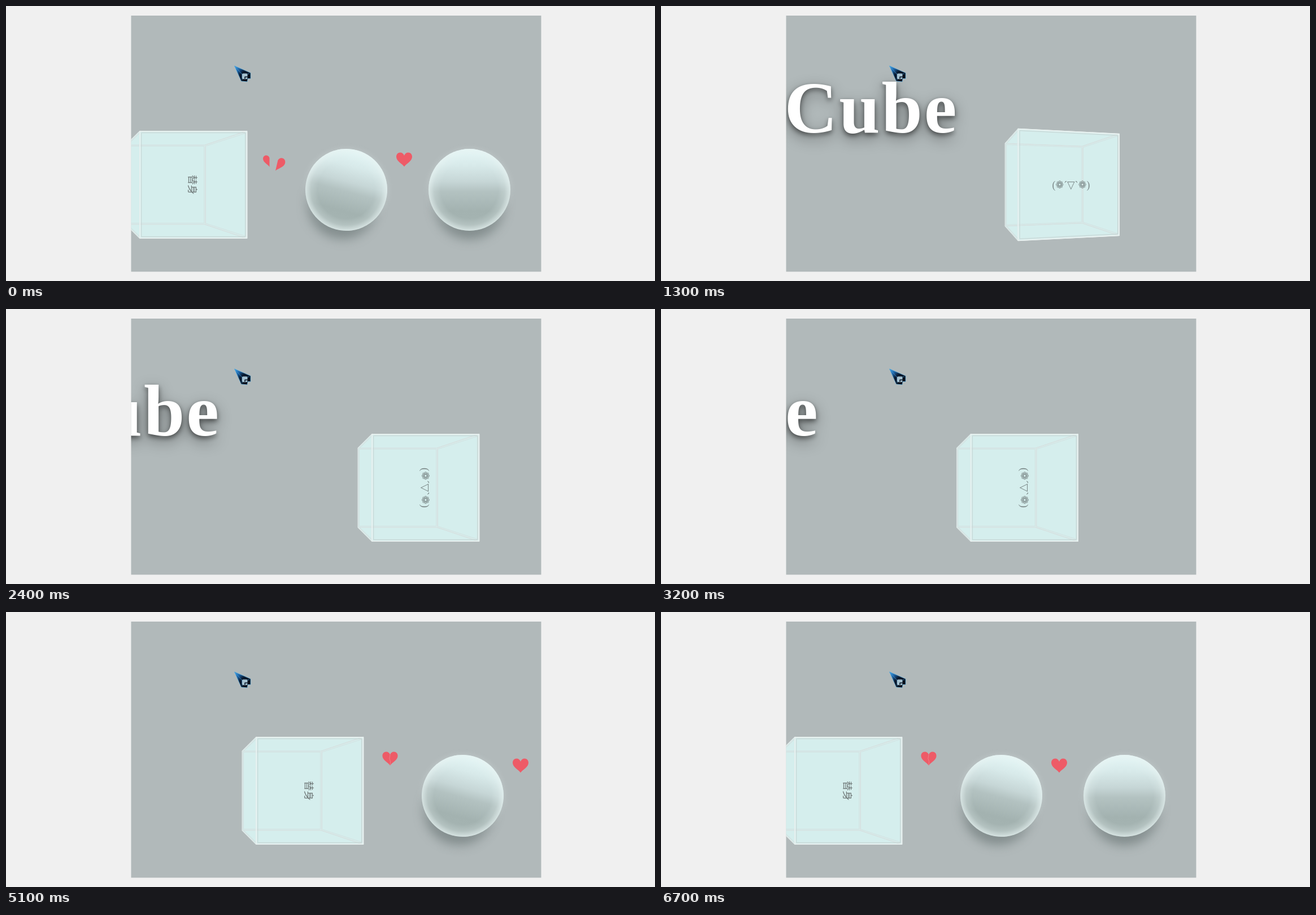
Animation, 1149 px wide and 487 px high, one loop 8000 ms. Source, as an HTML page:

```html
<!DOCTYPE html>
<html lang="en">
<head>
<meta charset="utf-8">
<title>Rolling cube</title>
<style>
html, body { margin: 0; width: 100%; height: 100%; overflow: hidden; background: #f0f0f0; }
svg { display: block; width: 1149px; height: 487px; }
#title { font: bold 130px "Liberation Serif", serif; letter-spacing: 3px; fill: #fff;
  filter: drop-shadow(0 4px 4px rgba(0,0,0,.5)) drop-shadow(0 8px 12px rgba(0,0,0,.35)); }
#label { font-family: "Liberation Serif", "DejaVu Sans", "Noto Sans CJK SC", "Noto Sans CJK", serif; text-anchor: middle; }
path { stroke-linejoin: round; }
</style>
</head>
<body>
<svg viewBox="0 0 1149 487">
  <defs>
    <clipPath id="frame"><rect x="221.5" y="17" width="726" height="453.5"/></clipPath>
    <linearGradient id="ball" x1="0" y1="0" x2="0" y2="1">
      <stop offset="0" stop-color="#e3f6f6"/>
      <stop offset=".2" stop-color="#d8eaea"/>
      <stop offset=".4" stop-color="#c6d6d6"/>
      <stop offset=".52" stop-color="#b3c2c1"/>
      <stop offset=".76" stop-color="#a3b2b0"/>
      <stop offset="1" stop-color="#a6b5b3"/>
    </linearGradient>
    <radialGradient id="rim">
      <stop offset=".7" stop-color="#e8f4f3" stop-opacity="0"/>
      <stop offset=".86" stop-color="#e8f4f3" stop-opacity=".22"/>
      <stop offset="1" stop-color="#e8f4f3" stop-opacity=".72"/>
    </radialGradient>
    <linearGradient id="blade" gradientUnits="userSpaceOnUse" x1="404" y1="106" x2="426" y2="128">
      <stop offset="0" stop-color="#3aa5f2"/>
      <stop offset=".35" stop-color="#1c5f9f"/>
      <stop offset=".6" stop-color="#0a1a30"/>
      <stop offset="1" stop-color="#060d18"/>
    </linearGradient>
    <filter id="soft" x="-50%" y="-50%" width="200%" height="200%"><feGaussianBlur stdDeviation="10"/></filter>
    <filter id="glow" x="-50%" y="-50%" width="200%" height="200%"><feGaussianBlur stdDeviation="5"/></filter>
    <path id="half" fill="#ee5b67" d="M0 12.5C-3 7.5-14 3-14-5C-14-9.5-11-12.5-7.2-12.5C-3.8-12.5-1-10.5 0-7Z"/>
    <g id="sphere">
      <circle r="74" fill="#d5dfdf" opacity=".3" filter="url(#glow)"/>
      <circle cy="26" r="61" fill="#5d6969" opacity=".6" filter="url(#soft)"/>
      <circle r="72.5" fill="url(#ball)"/>
      <circle r="72.5" fill="url(#rim)"/>
    </g>
  </defs>

  <rect width="1149" height="487" fill="#f0f0f0"/>
  <rect x="221.5" y="17" width="726" height="453.5" fill="#b1b9ba"/>
  <g clip-path="url(#frame)">
    <text id="title" y="224">Cube</text>
    <path id="ring" fill="#edf5f4" stroke="#edf5f4" stroke-width="2"/>
    <path id="body" fill="#d5eeed"/>
    <path id="edges" fill="none" stroke="#d9e5e4" stroke-width="1"/>
    <path id="insets" fill="none" stroke="#d3dedd" stroke-width=".8"/>
    <path id="frontInset" fill="none" stroke="#c6d3d2" stroke-width="1"/>
    <path id="front" fill="none" stroke="#e9f2f1" stroke-width="1.8"/>
    <text id="label"></text>
    <g id="row">
      <use href="#sphere" transform="translate(391.5 325.5) rotate(15)"/>
      <use href="#sphere" transform="translate(609.5 325.5)"/>
      <g transform="translate(494 272)">
        <use href="#half"/><use href="#half" transform="scale(-1 1)"/>
      </g>
      <g id="heart" transform="translate(263 259.7) scale(.97)">
        <use href="#half"/><use href="#half" transform="scale(-1 1)"/>
        <path d="M0-7L-1.2 0L.6 5L0 12" fill="none" stroke="#f08f97" stroke-width=".7"/>
      </g>
      <g id="broken">
        <use href="#half" transform="translate(255.5 274.7) scale(.82)"/>
        <use href="#half" transform="translate(266 292) rotate(13) translate(0 -12.5) scale(-.97 .97)"/>
      </g>
    </g>
  </g>
  <g id="pointer">
    <path d="M404.500 106L433 118.500V128.500H428L427 134L416.500 133Z" fill="url(#blade)" stroke="#58a9dc" stroke-width=".7"/>
    <path d="M405 106.500L418 121L418 131M418 121L431 120" fill="none" stroke="#3f94d2" stroke-width=".8"/>
    <rect x="418" y="119.500" width="9.500" height="10" rx="2" fill="#a5c1d0"/>
    <path d="M423 129V125.500H429" fill="none" stroke="#0a1626" stroke-width="1.500"/>
  </g>
</svg>
<script>
const $ = id => document.getElementById(id);
const LOOP = 8000, HALF = 80.5, DEPTH = 540, MID_Y = 316.5;

const range = (from, to, step) =>
  Array.from({ length: (to - from) / step + 1 }, (_, i) => from + i * step);

// The picture holds between these moments.
const ticks = [0, 400, ...range(600, 2400, 100), ...range(2900, 3400, 100),
  3600, 3700, 3900, ...range(4100, 4300, 100), ...range(4500, 6700, 200)];

const titleScroll = [[400, 112], [1300, 0], [2000, -96], [2400, -146.5], [3200, -246], [3400, -272]];
const rowScroll = [[3600, 612],
  ...[518, 493, 467, 440, 417, 388, 358, 329, 302, 274, 250, 220, 211].map((x, i) => [4300 + i * 200, x])];
const sway = [[400, 0], [1300, 16], [1400, 3], [1500, 0]];
const firstRoll = [[1500, 0], [2400, 90]];
const secondRoll = [[3600, 29], [4300, 90]];

function at(keys, t) {
  if (t <= keys[0][0]) return keys[0][1];
  for (let i = 1; i < keys.length; i++) {
    const [t0, v0] = keys[i - 1], [t1, v1] = keys[i];
    if (t <= t1) return v0 + (v1 - v0) * (t - t0) / (t1 - t0);
  }
  return keys[keys.length - 1][1];
}

// Corners of one face; k below 1 gives the line inside its border.
function face(axis, sign, k) {
  return [[-1, -1], [1, -1], [1, 1], [-1, 1]].map(([u, v]) => {
    const p = [u * k * HALF, v * k * HALF];
    p.splice(axis, 0, sign * HALF);
    return p;
  });
}

const sides = [[2, -1], [0, -1], [0, 1], [1, -1], [1, 1], [2, 1]];

// Turn about the vertical axis, then roll over the lower right edge.
function projector(eyeX, turn, roll) {
  const a = turn * Math.PI / 180, b = roll * Math.PI / 180;
  return ([x, y, z]) => {
    const tx = x * Math.cos(a) + z * Math.sin(a) - HALF, ty = y - HALF;
    const tz = z * Math.cos(a) - x * Math.sin(a);
    const rx = tx * Math.cos(b) - ty * Math.sin(b) + HALF;
    const ry = tx * Math.sin(b) + ty * Math.cos(b) + HALF;
    const s = DEPTH / (DEPTH - tz);
    return [eyeX + rx * s, MID_Y + ry * s];
  };
}

function drawCube(eyeX, turn, roll, text, size, baseline, color) {
  const project = projector(eyeX, turn, roll);
  const outline = (side, k) =>
    "M" + face(...side, k).map(p => project(p).map(n => n.toFixed(2)).join(" ")).join("L") + "Z";
  const all = sides.map(s => outline(s, 1));
  // Separate winding would leave holes, so the solid is filled with nonzero pairs.
  const solid = sides.map((s, i) => {
    const q = face(...s, 1).map(project);
    const area = q.reduce((sum, p, j) => {
      const n = q[(j + 1) % 4];
      return sum + p[0] * n[1] - n[0] * p[1];
    }, 0);
    return "M" + (area < 0 ? q.reverse() : q).map(p => p.join(" ")).join("L") + "Z";
  }).join("");
  $("ring").setAttribute("d", solid);
  $("body").setAttribute("d", solid);
  $("edges").setAttribute("d", all.join(""));
  $("insets").setAttribute("d", sides.slice(0, 5).map(s => outline(s, .972)).join(""));
  $("frontInset").setAttribute("d", outline(sides[5], .972));
  $("front").setAttribute("d", all[5]);

  const spot = (x, y) => project([x, y, HALF]);
  const slope = (p, q) => [(q[0] - p[0]) / 60, (q[1] - p[1]) / 60];
  const m = [...slope(spot(-30, 0), spot(30, 0)), ...slope(spot(0, -30), spot(0, 30)), ...spot(0, 0)];
  const label = $("label");
  if (label.textContent !== text) label.textContent = text;
  label.setAttribute("transform", `matrix(${m.join(" ")})`);
  label.setAttribute("font-size", size);
  label.setAttribute("y", baseline);
  label.setAttribute("fill", color);
}

const show = (id, on) => $(id).setAttribute("visibility", on ? "visible" : "hidden");

function render(time) {
  const t = ticks.filter(x => x <= time).pop();
  const titled = t >= 400 && t < 3600;
  show("title", titled);
  show("row", !titled);
  show("heart", t >= 5100);
  show("broken", t < 400);
  if (titled) {
    const shift = at(titleScroll, t);
    $("title").setAttribute("x", 218.4 + shift);
    drawCube(700 + shift, at(sway, t), at(firstRoll, t), "(❁´▽`❁)", 16, 5.5, "#7b8888");
  } else {
    const late = t < 400 ? LOOP : t;
    const left = at(rowScroll, late);
    $("row").setAttribute("transform", `translate(${left} 0)`);
    drawCube(left - 68.5, 0, at(secondRoll, late), "替身", 15, 6.7, "#6f7878");
  }
}

function loop(now) {
  render(now % LOOP);
  requestAnimationFrame(loop);
}
render(0);
requestAnimationFrame(loop);
</script>
</body>
</html>
```
